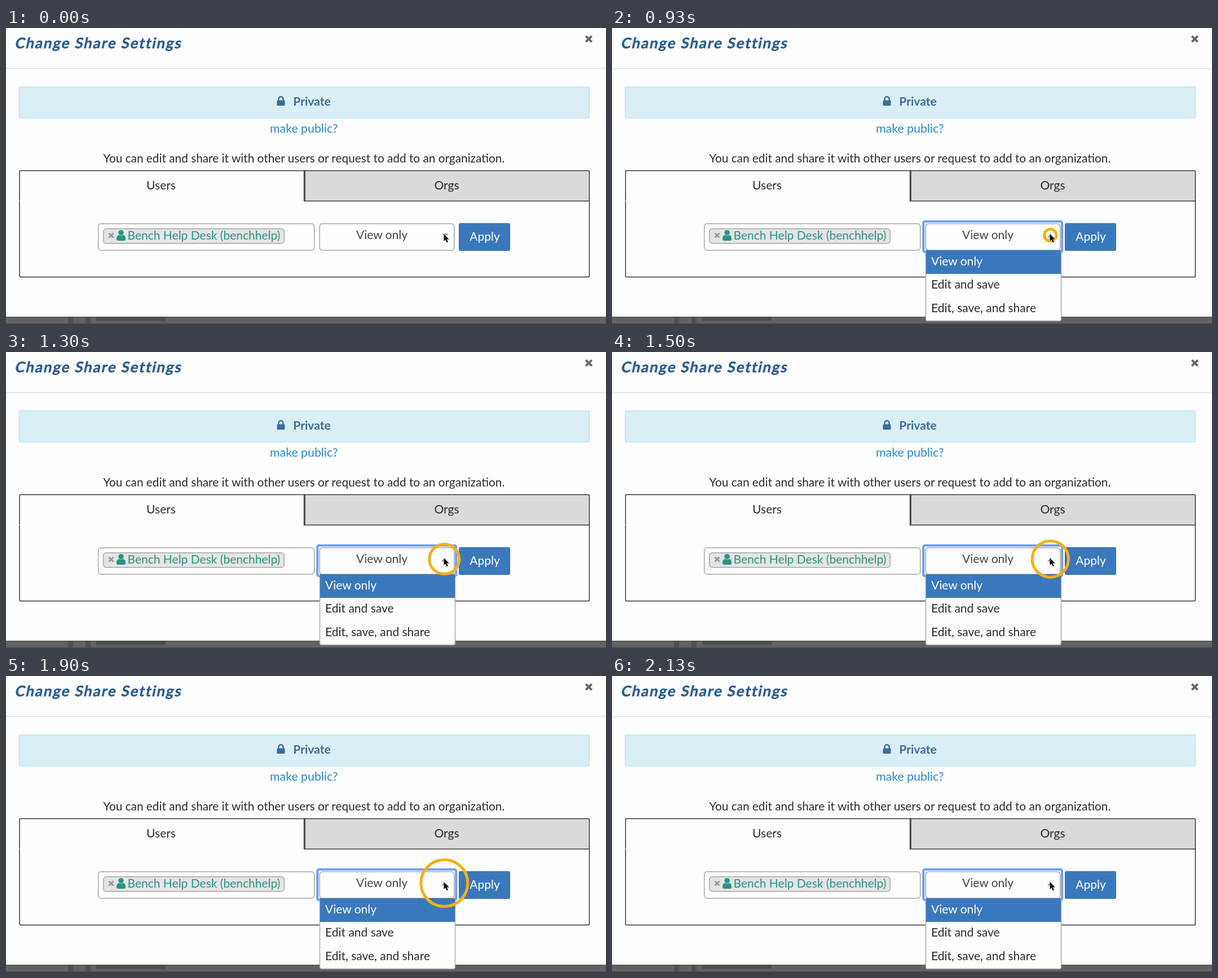
An HTML page for the animation above (2360 ms loop, 1064x526 px).

```html
<!DOCTYPE html>
<html lang="en">
<head>
<meta charset="utf-8">
<title>Share settings</title>
<style>
  html, body { margin: 0; width: 100%; height: 100%; overflow: hidden; background: #fefefe; }
  svg { display: block; width: 100%; height: 100%; }
  text { font: 21px Lato, "Open Sans", sans-serif; fill: #2b2b2b; }
  .mid { text-anchor: middle; }
  .title { font-size: 26px; font-weight: 700; letter-spacing: 1.8px; fill: #2a5d92; stroke: #2a5d92; stroke-width: .5; }
  .private { font-weight: 700; fill: #3a6c98; }
  .link { font-size: 21.3px; fill: #2787d2; }
  .note { font-size: 20.8px; }
  .user { fill: #2a9583; }
  .white { fill: #fff; }
  .choice { fill: #444; }
  .line { fill: none; stroke: #333; stroke-width: 1.5; }
  .field { fill: #fefefe; stroke: #a6a6a6; stroke-width: 1.5; }
  .blue { fill: #3a78bd; }
</style>
</head>
<body>
<svg viewBox="0 0 1064 526">
  <rect width="1064" height="526" fill="#fefefe"/>

  <!-- page behind the dialog -->
  <g>
    <rect y="513" width="1064" height="13" fill="#626262"/>
    <path d="M110 513h9v13h-9zM141 513h9v13h-9z" fill="#505050"/>
    <rect x="160" y="513" width="123" height="7.5" fill="#4b4f4a"/>
    <path d="M0 513.5H1064M0 525.5H1064" stroke="#444"/>
  </g>

  <!-- header -->
  <text class="title" transform="translate(15 36) skewX(-12)">Change Share Settings</text>
  <path d="M1028.3 14.3l10.400 10.400m0-10.400l-10.400 10.400" stroke="#666" stroke-width="4"/>
  <path d="M0 72H1064" stroke="#e6e6e6" stroke-width="2"/>

  <!-- privacy banner -->
  <rect x="23.5" y="104.5" width="1011" height="55.5" rx="2" fill="#daeef5" stroke="#bce5f0" stroke-width="1.5"/>
  <rect x="480.5" y="128.5" width="14" height="9.5" rx="1.5" fill="#3a6c98"/>
  <path d="M483.5 129v-3a4 4 0 0 1 8 0v3" fill="none" stroke="#3a6c98" stroke-width="2.4"/>
  <text class="mid private" x="542.5" y="137.5">Private</text>
  <text class="mid link" x="528.3" y="185.5">make public?</text>
  <text class="mid note" x="528.3" y="239">You can edit and share it with other users or request to add to an organization.</text>

  <!-- tabs -->
  <rect x="529" y="254" width="505" height="53.5" fill="#dadadc"/>
  <rect class="line" x="24" y="253.5" width="1010.5" height="189" rx="2"/>
  <path class="line" d="M528 307.5H1034"/>
  <path d="M529.3 254V308" stroke="#444" stroke-width="3"/>
  <path d="M22 307.5h4" stroke="#fefefe"/>
  <text class="mid" x="275" y="286.5">Users</text>
  <text class="mid" x="781.5" y="286.5">Orgs</text>

  <!-- chosen user -->
  <rect class="field" x="163.7" y="347.7" width="383" height="47.3" rx="5"/>
  <rect x="172.7" y="356.7" width="320.6" height="26" rx="5" fill="#e4e4e4" stroke="#a6a6a6" stroke-width="1.5"/>
  <path d="M182.5 364.5l8 8m0-8l-8 8" stroke="#999" stroke-width="3"/>
  <g class="user">
    <circle cx="204" cy="363.7" r="4.8"/>
    <path d="M196 375c0-5 2-7 4.5-7q3.5 2 7 0c2.5 0 4.500 2 4.500 7q0 3-3 3h-10q-3 0-3-3z"/>
  </g>
  <text class="user" x="215.5" y="375.5">Bench Help Desk (benchhelp)</text>

  <!-- permission select -->
  <rect id="focus" x="552.2" y="343.7" width="246" height="54.6" rx="3" fill="none" stroke="#6d9ff7" stroke-width="4"/>
  <rect class="field" x="556.2" y="347.7" width="238.6" height="47.3" rx="5"/>
  <text class="mid choice" x="666.5" y="374.5">View only</text>
  <path id="arrow"/>
  <rect class="blue" x="803.5" y="347.2" width="90" height="48.3" rx="2" stroke="#3069a6"/>
  <text class="mid white" x="849" y="377.5">Apply</text>

  <g id="menu">
    <path d="M556.5 395H796.5V517.5q0 3-3 3H559.5q-3 0-3-3z" fill="#fefefe" stroke="#a6a6a6" stroke-width="1.4"/>
    <rect class="blue" x="557" y="395" width="239" height="42"/>
    <text class="white" x="566" y="421.5">View only</text>
    <text x="566" y="463">Edit and save</text>
    <text x="566" y="504.5">Edit, save, and share</text>
  </g>

  <circle id="ring" cx="777.3" cy="368" fill="none" stroke="#f4b013" stroke-width="5"/>
  <path d="M776.4 366v13l3-2.7 2.2 5 2.4-1-2.2-4.900h4.100z" fill="#111" stroke="#fff" stroke-width="1.2" paint-order="stroke"/>
</svg>
<script>
  const LOOP = 2360, CLICK = 860, OPEN = 930, RELEASE = 1900, GONE = 2130;
  const [focusBox, arrow, menu, ring] =
    ["focus", "arrow", "menu", "ring"].map(id => document.getElementById(id));
  const show = (el, on) => el.setAttribute("visibility", on ? "visible" : "hidden");

  // Motion advances at 30 steps a second, on a 10 ms clock.
  function stepTime(t) {
    const step = Math.floor(3 * Math.floor((t - CLICK) / 10) / 10);
    return CLICK + 10 * Math.ceil(step * 10 / 3);
  }

  function draw(now) {
    const t = now % LOOP;
    const time = stepTime(t);
    const open = t >= OPEN;
    const pressed = t >= CLICK && !open;

    show(focusBox, open);
    show(menu, open);
    arrow.setAttribute("d", open ? "M772 372h11l-5.5-5.5z" : "M772.5 365.5h12l-6 6z");
    arrow.setAttribute("fill", pressed ? "#c9a02c" : "#888");

    const ringOn = t >= CLICK + 40 && t < GONE;
    show(ring, ringOn);
    if (ringOn) {
      const age = time - CLICK + 10;
      ring.setAttribute("r", 1.04 * age ** 0.53);
      ring.setAttribute("opacity", 1 - Math.max(0, (time - RELEASE) / (GONE - RELEASE)));
    }
  }

  const start = performance.now();
  function tick() {
    draw(performance.now() - start);
    requestAnimationFrame(tick);
  }
  tick();
</script>
</body>
</html>
```
